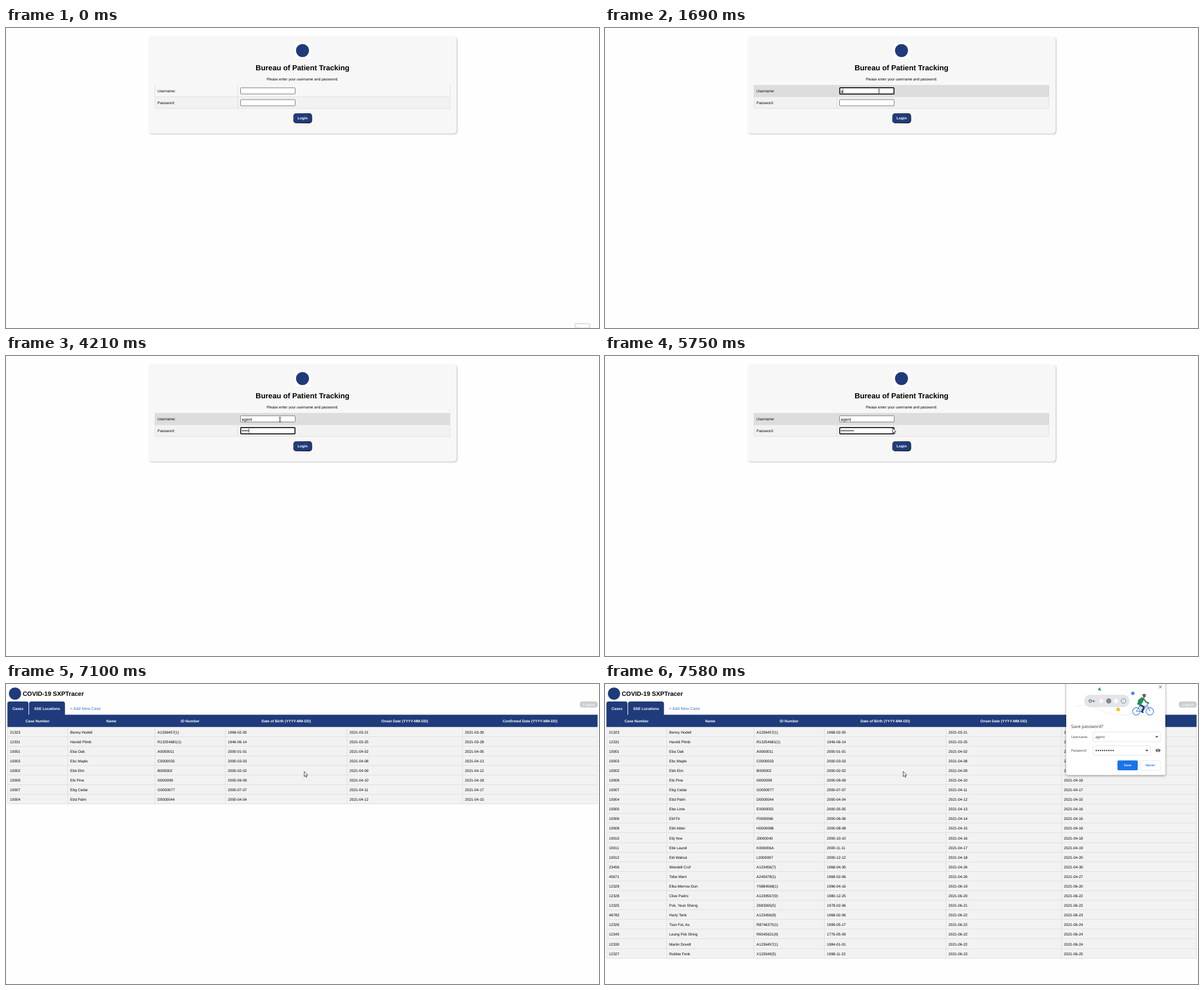
An HTML page with a canvas for the animation above (8 s loop, 1053 by 532 pixels).

```html
<!DOCTYPE html>
<html lang="en">
<head>
<meta charset="utf-8">
<title>Login and case list</title>
<style>
  html, body { margin: 0; width: 100%; height: 100%; overflow: hidden; background: #fefefe; }
  canvas { display: block; width: 1053px; height: 532px; }
</style>
</head>
<body>
<canvas id="stage" width="1053" height="532"></canvas>
<script>
const ctx = document.getElementById('stage').getContext('2d');
const LOOP = 8000;
const NAVY = '#1f3b7b';
const LINE = '#e0e0e0';
const SANS = '"Liberation Sans", Arial, sans-serif';
const UI = '"Open Sans", "Noto Sans", sans-serif';
const SMALL = 6.58, FIELD = 7.31;
const USER = 'agent';

const userKeys = [1690, 1890, 2020, 2220, 2420];
const passKeys = [3280, 3480, 3740, 4010, 4210, 4410, 4680, 4950, 5150];

const edges = [2.5, 109.5, 264.5, 389.5, 605.5, 810.5, 1050.5];
const heads = ['Case Number', 'Name', 'ID Number', 'Date of Birth (YYYY-MM-DD)',
  'Onset Date (YYYY-MM-DD)', 'Confirmed Date (YYYY-MM-DD)'];
const cases = `21323|Benny Hodell|A1336457(1)|1968-02-05|2021-03-21|2021-03-30
12331|Harold Plimb|R13254681(1)|1946-06-14|2021-03-25|2021-03-28
10001|Eba Oak|A0000011|2000-01-01|2021-04-02|2021-04-05
10003|Ebc Maple|C0000033|2000-03-03|2021-04-08|2021-04-13
10002|Ebb Elm|B000002|2000-02-02|2021-04-09|2021-04-12
10009|Ebi Pine|I0000099|2000-09-09|2021-04-10|2021-04-18
10007|Ebg Cedar|G0000077|2000-07-07|2021-04-11|2021-04-17
10004|Ebd Palm|D0000044|2000-04-04|2021-04-12|2021-04-15
10005|Ebe Lime|E0000055|2000-05-05|2021-04-13|2021-04-16
10006|Ebf Fir|F0000066|2000-06-06|2021-04-14|2021-04-16
10008|Ebh Alder|H0000088|2000-08-08|2021-04-15|2021-04-18
10010|Ebj Yew|J0000040|2000-10-10|2021-04-16|2021-04-18
10011|Ebk Laurel|K000006A|2000-11-11|2021-04-17|2021-04-19
10012|Ebl Walnut|L0000097|2000-12-12|2021-04-18|2021-04-20
23456|Wendell Crof|A123456(7)|1968-04-30|2021-04-26|2021-04-30
45671|Tobe Marn|A245678(1)|1968-02-06|2021-04-26|2021-04-27
12329|Elka Merrow Dun|Y5884568(1)|1996-04-16|2021-06-19|2021-06-20
12328|Clive Padro|A1239567(9)|1980-12-25|2021-06-20|2021-06-22
12325|Pok, Yeun Sheng|Z683365(5)|1978-02-06|2021-06-21|2021-06-22
46782|Harly Tenk|A123456(9)|1968-02-06|2021-06-22|2021-06-23
12326|Tsun Fai, Au|R8746375(1)|1999-05-17|2021-06-22|2021-06-24
12345|Leung Pok Shing|R6545621(0)|1776-05-09|2021-06-22|2021-06-24
12330|Martin Dovell|A1236457(1)|1984-01-01|2021-06-22|2021-06-24
12327|Robbie Fenk|X123549(5)|1998-11-22|2021-06-23|2021-06-25`
  .split('\n').map(row => row.split('|'));

// Text is placed by the middle of its capitals.
function text(str, x, y, size, { color = '#000', align = 'left', weight = 400, font = SANS } = {}) {
  ctx.font = `${weight} ${size}px ${font}`;
  ctx.textRendering = 'geometricPrecision';
  ctx.textAlign = align;
  ctx.fillStyle = color;
  ctx.fillText(str, x, y + size * 0.358);
}

function rect(x, y, w, h, color) {
  ctx.fillStyle = color;
  ctx.fillRect(x, y, w, h);
}

function round(x, y, w, h, r, fill, stroke, width = 1) {
  ctx.beginPath();
  ctx.roundRect(x, y, w, h, r);
  paint(fill, stroke, width);
}

function dot(x, y, r, fill, stroke, width = 1) {
  ctx.beginPath();
  ctx.arc(x, y, r, 0, Math.PI * 2);
  paint(fill, stroke, width);
}

function poly(points, fill, stroke, width = 1, closed = true) {
  ctx.beginPath();
  points.forEach(([x, y]) => ctx.lineTo(x, y));
  if (closed) ctx.closePath();
  paint(fill, stroke, width);
}

function paint(fill, stroke, width) {
  if (fill) { ctx.fillStyle = fill; ctx.fill(); }
  if (stroke) { ctx.strokeStyle = stroke; ctx.lineWidth = width; ctx.stroke(); }
}

function withShadow(color, blur, dx, dy, draw) {
  ctx.save();
  ctx.shadowColor = color;
  ctx.shadowBlur = blur;
  ctx.shadowOffsetX = dx;
  ctx.shadowOffsetY = dy;
  draw();
  ctx.restore();
}

const typed = (keys, t) => keys.filter(at => t >= at).length;

// Pointer motion advances in discrete steps, as a screen recorder sees it.
const outPath = [[497, 118], [510.5, 127.5], [523, 143], [531, 157], [534, 166],
  [534, 168], [532, 165], [530, 160], [529.5, 156], [529.5, 155]];

function inPath(k) {
  if (k >= 10) return [486.5, 112.5];
  const u = k / 9, e = u * u * (3 - 2 * u);
  return [1023 - 534 * e, 528 - 410.5 * e];
}

function pointer(t) {
  if (t < 70) return null;
  if (t < 5680) return inPath(Math.floor((t - 70) / 76));
  return outPath[Math.min(9, Math.floor((t - 5680) / 76.6 + 0.1))];
}

function hoveredRow(t) {
  const p = pointer(t < 5680 ? t : t - 77);
  if (!p || p[0] < 264 || p[0] > 789) return -1;
  return p[1] < 101 || p[1] >= 143 ? -1 : p[1] < 122 ? 0 : 1;
}

function drawPointer(t) {
  const p = pointer(t);
  if (!p) return;
  const [x, y] = p;
  const inField = t < 5680 && x > 416 && x < 514 && y > 105 && y < 117;
  if (inField) {
    rect(x - 0.5, y - 4, 1, 8.5, '#222');
    rect(x - 2, y - 4.5, 4, 0.8, '#444');
    rect(x - 2, y + 4, 4, 0.8, '#444');
    return;
  }
  const shape = [[0, 0], [0, 9.2], [2.1, 7.3], [3.5, 10.4], [4.9, 9.8], [3.5, 6.8], [6.3, 6.6]];
  poly(shape.map(([a, b]) => [x + a, y + b]), '#fff', '#111', 0.75);
}

function input(y, focused) {
  if (focused) round(416.8, y + 0.3, 96.4, 11.4, 1.2, '#fff', '#101010', 1.7);
  else round(416.5, y + 0.5, 97, 11, 1.2, '#fff', '#777', 1);
}

function caret(x, y) {
  rect(x, y - 4.3, 0.7, 8.6, '#222');
}

function drawLogin(t) {
  withShadow('rgba(0,0,0,.2)', 2.5, 1.6, 1.6, () => round(253, 15, 547, 172, 5, '#f7f7f7'));
  rect(513, 26, 28, 28, '#fff');
  dot(526.5, 40, 11.5, NAVY);
  text('Bureau of Patient Tracking', 526.5, 70.5, 13.16, { align: 'center', weight: 700 });
  text('Please enter your username and password.', 526.5, 91, SMALL, { align: 'center' });

  const hot = hoveredRow(t);
  rect(264, 122, 525, 21, '#f2f2f2');
  rect(264, 101, 1, 42, LINE);
  rect(411, 101, 1, 42, LINE);
  rect(788, 101, 1, 42, LINE);
  rect(264, 121.5, 525, 1, LINE);
  rect(264, 142, 525, 1, LINE);
  if (hot >= 0) rect(264, 101 + hot * 21, 525, 21, '#ddd');
  text('Username:', 269, 111.8, SMALL);
  text('Password:', 269, 132.6, SMALL);

  const onUser = t >= 960 && t < 2680;
  const onPass = t >= 2680 && t < 6290;
  input(105.5, onUser);
  input(126.5, onPass);

  const name = USER.slice(0, typed(userKeys, t));
  text(name, 418.6, 111.9, FIELD);
  const blinkOff = t >= 1490 && t < 1690;
  if (onUser && t >= 1030 && !blinkOff) caret(418.3 + ctx.measureText(name).width, 111.7);

  const count = typed(passKeys, t);
  for (let i = 0; i < count; i++) dot(420 + i * 2.57, 132.5, 0.95, '#000');
  if (onPass && t < 5680) caret(418.3 + count * 2.57, 132.5);

  const edge = ctx.createLinearGradient(520, 150, 533, 170);
  edge.addColorStop(0, '#6d7280');
  edge.addColorStop(1, '#0c0c10');
  round(510.5, 151.5, 32.5, 17, 4.5, NAVY, edge, 1.1);
  text('Login', 526.7, 160, SMALL, { color: '#fff', align: 'center', weight: 700 });

  if (t < 70) {
    round(1010.5, 524.5, 26, 14, 0.5, '#fff', '#c6c6c6');
    text('Record', 1023.5, 532.5, 7, { color: '#bdbdbd', align: 'center' });
  }
}

function drawCases(rowCount) {
  dot(16, 17, 10.8, NAVY);
  text('COVID-19 SXPTracer', 29.7, 16.6, 10.97, { weight: 700 });

  const white = { color: '#fff', align: 'center', weight: 700 };
  round(2.5, 31, 37.5, 24, [4, 4, 0, 0], NAVY);
  round(41, 31, 63.7, 24, [4, 4, 0, 0], NAVY);
  text('Cases', 21.2, 43.2, SMALL, white);
  text('SSE Locations', 73, 43.2, SMALL, white);
  text('+ Add New Case', 113.7, 43.2, FIELD, { color: '#2f78cf' });
  round(1019, 31, 31.5, 10.7, 4, '#ccc');
  text('Logout', 1034.7, 36.5, 7, { color: '#fff', align: 'center' });

  rect(2.5, 54.5, 1048, 22, NAVY);
  heads.forEach((head, i) => text(head, (edges[i] + edges[i + 1]) / 2, 65.5, SMALL, white));

  const pitch = 17.09, top = 76.5, height = rowCount * pitch;
  rect(2.5, top, 1048, height, '#f2f2f2');
  for (let i = 1; i <= rowCount; i++) rect(2, Math.round(top + i * pitch) - 1, 1049, 1, LINE);
  edges.forEach(x => rect(Math.floor(x), top, 1, height, LINE));
  cases.slice(0, rowCount).forEach((row, r) =>
    row.forEach((cell, c) => text(cell, edges[c] + 4.6, 85.2 + r * pitch, SMALL)));
}

function drawCyclist() {
  const blue = '#3f7fe0', skin = '#8d5a4a';
  dot(943.5, 48.5, 6.6, null, blue, 1.2);
  dot(967.5, 48.5, 6.6, null, blue, 1.2);
  poly([[943.5, 48.5], [949, 39], [962, 39], [955, 48.5], [943.5, 48.5]], null, blue, 1.1, false);
  poly([[949, 39], [955, 48.5]], null, blue, 1, false);
  poly([[967.5, 48.5], [962, 35.5], [966, 35]], null, blue, 1.1, false);
  poly([[949, 36], [957, 41], [953, 50]], null, '#27364d', 3, false);
  poly([[953, 50], [956.5, 50.5]], null, '#202124', 1.6, false);
  poly([[945, 36], [947, 28], [953, 23.5], [958, 25], [955, 32], [951, 38]], '#1e8e5a');
  poly([[956, 26], [961, 32], [966, 34]], null, '#1e8e5a', 2.4, false);
  dot(957.5, 21.3, 2.7, skin);
  poly([[953.5, 20], [955, 17.8], [959, 17.5], [961.5, 19.6]], '#5f6368');
}

function drawPopupArt() {
  ctx.beginPath();
  ctx.moveTo(833, 41);
  ctx.bezierCurveTo(850, 35, 862, 37, 878, 45);
  ctx.bezierCurveTo(900, 56, 922, 58, 938, 51);
  paint(null, '#e3e5e8', 0.8);
  poly([[938, 55.5], [977, 55.5]], null, '#e3e5e8', 0.8, false);

  round(851, 19, 80.5, 22, 11, '#e3e5e9');
  const gray = '#80868b';
  dot(861.7, 30, 2.3, null, gray, 1.6);
  rect(863.5, 29.1, 6.5, 1.8, gray);
  rect(867, 30, 1.7, 2.6, gray);
  poly([[878.5, 25.5], [887, 30], [878.5, 34.5]], '#f8f9fa');
  dot(894.5, 30, 4.6, gray);
  poly([[907.5, 25], [912.5, 30], [907.5, 35], [902.5, 30]], '#f8f9fa');
  dot(920.7, 30, 4.2, null, gray, 1);

  poly([[878.5, 5.8], [881.5, 12], [874.8, 10.5]], '#34a853');
  dot(937.3, 16.5, 2.9, '#4285f4');
  poly([[909, 42], [914.5, 43], [913.5, 48.5], [908, 47.2]], '#fbbc04');
  drawCyclist();
}

function drawPopup(alpha) {
  ctx.save();
  ctx.globalAlpha = alpha;
  withShadow('rgba(0,0,0,.45)', 4, 0, 1, () => round(819, -6, 176, 167.5, 2, '#fff'));
  drawPopupArt();
  poly([[983.7, 2.5], [988.7, 7.5]], null, '#444', 0.9, false);
  poly([[988.7, 2.5], [983.7, 7.5]], null, '#444', 0.9, false);

  const ui = (str, x, y, size, opts) => text(str, x, y, size, { color: '#333', font: UI, ...opts });
  const frame = (x, y, w, h) => round(x, y, w, h, 2, '#fff', '#dfe1e5', 0.9);
  const arrow = (x, y) => poly([[x - 2.6, y - 1.2], [x + 2.6, y - 1.2], [x, y + 1.5]], '#333');
  ui('Save password?', 827.7, 75, 7.75);
  ui('Username', 827.7, 94, 6);
  ui('Password', 827.7, 118, 6);
  frame(866.5, 85, 119.5, 17);
  frame(866.5, 109.5, 102, 17);
  ui(USER, 870.8, 94, 6.3);
  arrow(979.8, 93.8);
  arrow(962.2, 118);
  for (let i = 0; i < 9; i++) dot(872.3 + i * 3.75, 118, 1.15, '#222');

  ctx.beginPath();
  ctx.ellipse(982, 117.8, 4.2, 2.8, 0, 0, Math.PI * 2);
  paint('#555');
  dot(982, 117.8, 1.7, '#555', '#fff', 0.8);

  round(910, 135.5, 36, 17.5, 2, '#1a73e8');
  frame(950.5, 136, 35.5, 17);
  const label = { align: 'center', weight: 600 };
  ui('Save', 928, 144.3, 6, { ...label, color: '#fff' });
  ui('Never', 968.3, 144.3, 6, { ...label, color: '#1a73e8' });
  ctx.restore();
}

function render(t) {
  rect(0, 0, 1053, 532, '#fefefe');
  if (t < 7100) drawLogin(t);
  else drawCases(t < 7300 ? 8 : cases.length);
  if (t >= 7370) drawPopup(Math.min(1, (Math.floor((t - 7370) / 70) + 1) / 4));
  drawPointer(t);
}

const start = performance.now();
function tick() {
  render((performance.now() - start) % LOOP);
  requestAnimationFrame(tick);
}
tick();
</script>
</body>
</html>
```
